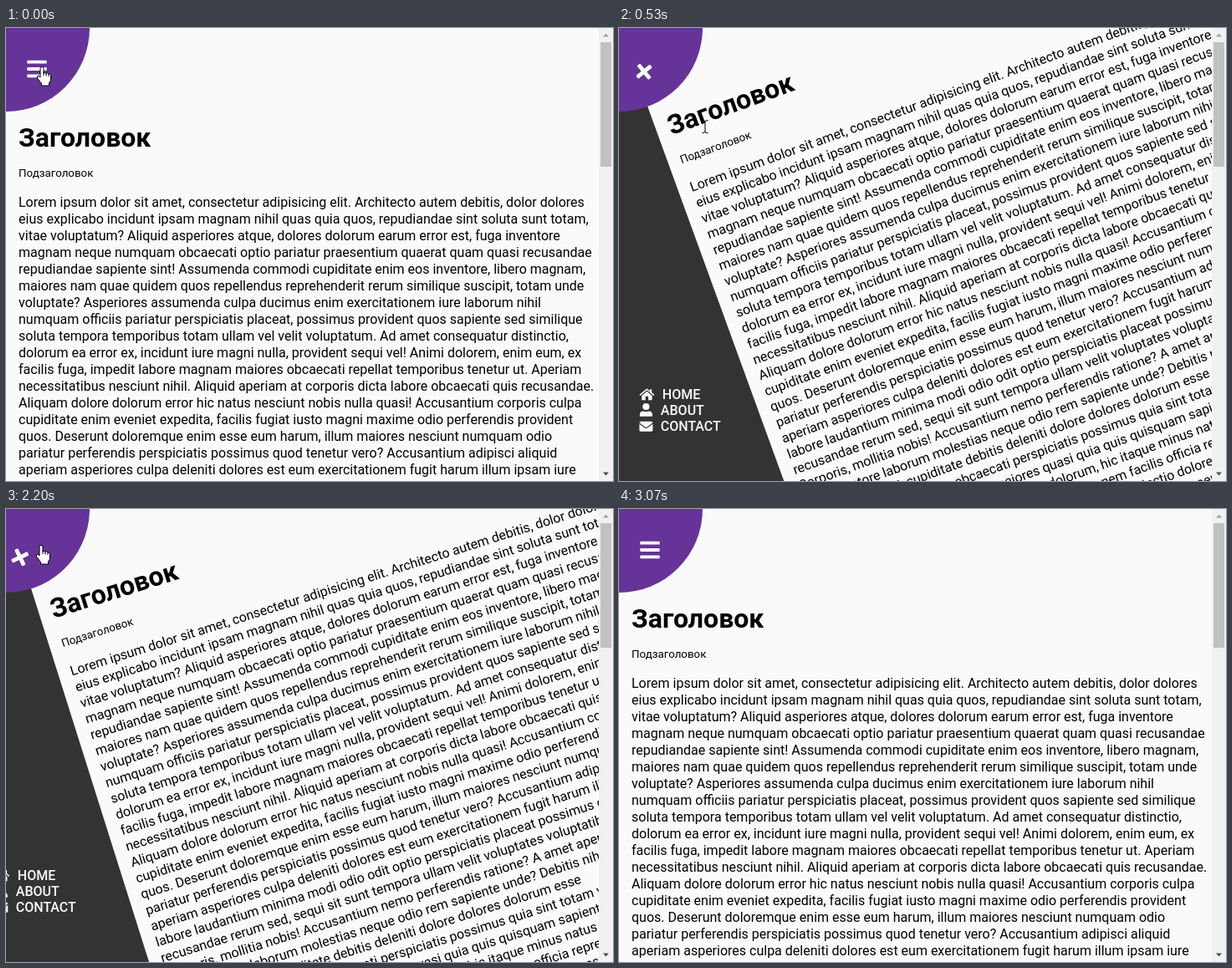
Animation of 726 by 542 pixels, one loop 3940 ms. Source, as an HTML page:

```html
<!DOCTYPE html>
<html lang="ru">
<head>
<meta charset="utf-8">
<title>Rotating page menu</title>
<style>
  html, body { margin: 0; width: 100%; height: 100%; overflow: hidden; background: #333; }
  svg { display: block; font: 16px Roboto, sans-serif; }
  .nav { fill: #fafafa; font-weight: 500; }
  .cursors g { visibility: hidden; }
</style>
</head>
<body>
<svg width="726" height="542" viewBox="0 0 726 542">
  <g id="page">
    <rect width="2000" height="2000" fill="#fafafa"/>
    <text x="15" y="142" font-size="32" font-weight="700">Заголовок</text>
    <text x="15" y="178" font-size="13.333">Подзаголовок</text>
  </g>

  <g id="nav" class="nav">
    <path d="M49 431.2l3.6 3v-2h2.2v3.9l3.2 2.7-.9 1.1-8.1-6.7-8.1 6.7-.9-1.1z M49 434.8l6.2 5.2v5.2h-4.5v-4.5h-3.4v4.5h-4.5V440z"/>
    <text x="67.5" y="444">HOME</text>
    <circle cx="48" cy="453" r="4.1"/>
    <path d="M40.5 464.8v-2.2q0-4.2 4.2-4.2 3.3 1.4 6.6 0 4.2 0 4.2 4.2v2.2z"/>
    <text x="65.5" y="463">ABOUT</text>
    <path d="M40 472.2q0-1.5 1.5-1.5h13q1.5 0 1.5 1.5l-6.6 5q-1.4 1-2.8 0z M40 473.8l6 4.5q2 1.3 4 0l6-4.5v7.4q0 1.5-1.5 1.5h-13q-1.5 0-1.5-1.5z"/>
    <text x="65.5" y="482">CONTACT</text>
  </g>

  <g id="dial" fill="#fff">
    <circle r="100" fill="#639"/>
    <g transform="translate(25.3 38.8)">
      <rect width="23.4" height="3.8" rx=".9"/>
      <rect width="23.4" height="3.8" rx=".9" y="8.3"/>
      <rect width="23.4" height="3.8" rx=".9" y="16.6"/>
    </g>
    <g transform="translate(-49 35) rotate(45)">
      <rect x="-10.8" y="-2.4" width="21.6" height="4.8" rx="1.3"/>
      <rect x="-2.4" y="-10.8" width="4.8" height="21.6" rx="1.3"/>
    </g>
  </g>

  <rect x="709" width="17" height="542" fill="#f1f1f1"/>
  <rect x="711" y="17" width="13" height="149" fill="#c1c1c1"/>
  <path d="M714 10.500h7l-3.500-4z" fill="#a3a3a3"/>
  <path d="M714 531.500h7l-3.500 4z" fill="#505050"/>

  <g class="cursors" fill="#fff" stroke="#000">
    <g id="hand"><path d="M-2 2Q0-1.500 2 2V8Q4 6.500 5 8.500Q7 7 8 9Q10 8.500 10.500 10.500V15Q10.500 18 8.500 20V23H-.5V20.500L-5.500 14Q-6.500 11-4 11L-2 13Z"/>
      <path d="M2 7v4M5 8v3.500M8 9v3" fill="none"/></g>
    <g id="arrow"><path d="M0 0V16L3.700 12.500L6.200 18.300L8.600 17.200L6.200 11.500H11.300Z"/></g>
    <g id="beam"><path d="M-3.500-7.500Q0-7.500 0-6Q0-7.500 3.500-7.500M0-6V6M-3.500 7.500Q0 7.500 0 6Q0 7.500 3.500 7.500" fill="none"/></g>
  </g>
</svg>

<script>
const LOOP = 3940, TICK = 200 / 3;
const OPEN = 187, CLOSE = 2118;
const $ = id => document.getElementById(id);

const lines = `Lorem ipsum dolor sit amet, consectetur adipisicing elit. Architecto autem debitis, dolor dolores
eius explicabo incidunt ipsam magnam nihil quas quia quos, repudiandae sint soluta sunt totam,
vitae voluptatum? Aliquid asperiores atque, dolores dolorum earum error est, fuga inventore
magnam neque numquam obcaecati optio pariatur praesentium quaerat quam quasi recusandae
repudiandae sapiente sint! Assumenda commodi cupiditate enim eos inventore, libero magnam,
maiores nam quae quidem quos repellendus reprehenderit rerum similique suscipit, totam unde
voluptate? Asperiores assumenda culpa ducimus enim exercitationem iure laborum nihil
numquam officiis pariatur perspiciatis placeat, possimus provident quos sapiente sed similique
soluta tempora temporibus totam ullam vel velit voluptatum. Ad amet consequatur distinctio,
dolorum ea error ex, incidunt iure magni nulla, provident sequi vel! Animi dolorem, enim eum, ex
facilis fuga, impedit labore magnam maiores obcaecati repellat temporibus tenetur ut. Aperiam
necessitatibus nesciunt nihil. Aliquid aperiam at corporis dicta labore obcaecati quis recusandae.
Aliquam dolore dolorum error hic natus nesciunt nobis nulla quasi! Accusantium corporis culpa
cupiditate enim eveniet expedita, facilis fugiat iusto magni maxime odio perferendis provident
quos. Deserunt doloremque enim esse eum harum, illum maiores nesciunt numquam odio
pariatur perferendis perspiciatis possimus quod tenetur vero? Accusantium adipisci aliquid
aperiam asperiores culpa deleniti dolores est eum exercitationem fugit harum illum ipsam iure
labore laudantium minima modi odio odit optio perspiciatis placeat possimus quas qui
recusandae rerum sed, sequi sit sunt tempora ullam velit voluptates voluptatibus voluptatum.
Corporis, mollitia nobis! Accusantium nemo perferendis ratione? A amet aperiam, debitis
eos inventore laborum molestias neque odio rem sapiente unde? Debitis nihil similique
eaque commodi, cupiditate debitis deleniti dolore dolores dolorum esse
fugiat illum itaque nemo obcaecati perspiciatis possimus quia sint totam voluptate
exercitationem iste labore non maiores quasi quia quis quisquam sapiente
voluptatem. Ab asperiores dignissimos dolorum, hic itaque minus natus quae ratione.
Beatae consequuntur debitis eligendi exercitationem facilis officia reprehenderit
tempore voluptates. Accusamus cumque delectus distinctio dolore, esse fugit harum
ipsa laboriosam, magni nesciunt nobis odit omnis possimus quaerat, qui rem repellat sint`.split("\n");

lines.forEach((line, i) => {
  const text = document.createElementNS("http://www.w3.org/2000/svg", "text");
  text.setAttribute("x", 15);
  text.setAttribute("y", 214 + 20 * i);
  text.textContent = line;
  $("page").append(text);
});

// Time, x, y and pointer shape, which holds until the next entry
const pointer = [
  [0, 43, 46, "hand"], [200, 43, 47, "hand"], [260, 45, 52, "arrow"], [340, 45, 52, "arrow"],
  [460, 78, 90, "arrow"], [530, 102, 117, "beam"], [733, 142, 168, "beam"], [800, 147, 173, "beam"],
  [1334, 147, 173, "beam"], [1400, 137, 167, "beam"], [1530, 98, 124, "arrow"], [1730, 52, 62, "hand"],
  [1860, 43, 45, "hand"], [1930, 42, 43, "hand"], [2200, 42, 43, "hand"], [2330, 48, 54, "hand"],
  [2466, 62, 79, "hand"], [2530, 74, 108, "arrow"], [2600, 92, 155, "beam"], [2730, 135, 340, "beam"],
  [2870, 155, 560, "beam"], [LOOP, 155, 560, "beam"]
];

function bezier(x1, y1, x2, y2) {
  const at = (s, a, b) => 3 * s * (1 - s) ** 2 * a + 3 * s * s * (1 - s) * b + s ** 3;
  return x => {
    if (x <= 0) return 0;
    if (x >= 1) return 1;
    let lo = 0, hi = 1;
    for (let i = 0; i < 24; i++) {
      const mid = (lo + hi) / 2;
      if (at(mid, x1, x2) < x) lo = mid; else hi = mid;
    }
    return at(lo, y1, y2);
  };
}
const ease = bezier(.25, .1, .25, 1);
const easeIn = bezier(.42, 0, 1, 1);

// 0 is closed, 1 is open
const openness = (t, duration, curve) =>
  t < CLOSE ? curve((t - OPEN) / duration) : 1 - curve((t - CLOSE) / duration);

const move = (id, transform) => $(id).setAttribute("transform", transform);

function movePointer(t) {
  const i = pointer.findIndex(p => p[0] > t);
  const [t0, x0, y0, shape] = pointer[i - 1], [t1, x1, y1] = pointer[i];
  const k = (t - t0) / (t1 - t0);
  for (const id of ["hand", "arrow", "beam"])
    $(id).style.visibility = id === shape ? "visible" : "hidden";
  move(shape, `translate(${Math.round(x0 + (x1 - x0) * k)} ${Math.round(y0 + (y1 - y0) * k)})`);
}

function draw(t) {
  const menu = openness(t, 500, ease);
  move("page", `rotate(${-20 * openness(t, 280, easeIn)})`);
  move("dial", `rotate(${-90 * menu})`);
  move("nav", `translate(${-250 * (1 - menu)} 0)`);
  movePointer(t);
}

const start = performance.now();
function tick() {
  const t = (performance.now() - start) % LOOP;
  draw(Math.floor((t + 4) / TICK) * TICK); // 15 poses per second
  requestAnimationFrame(tick);
}
tick();
</script>
</body>
</html>
```
